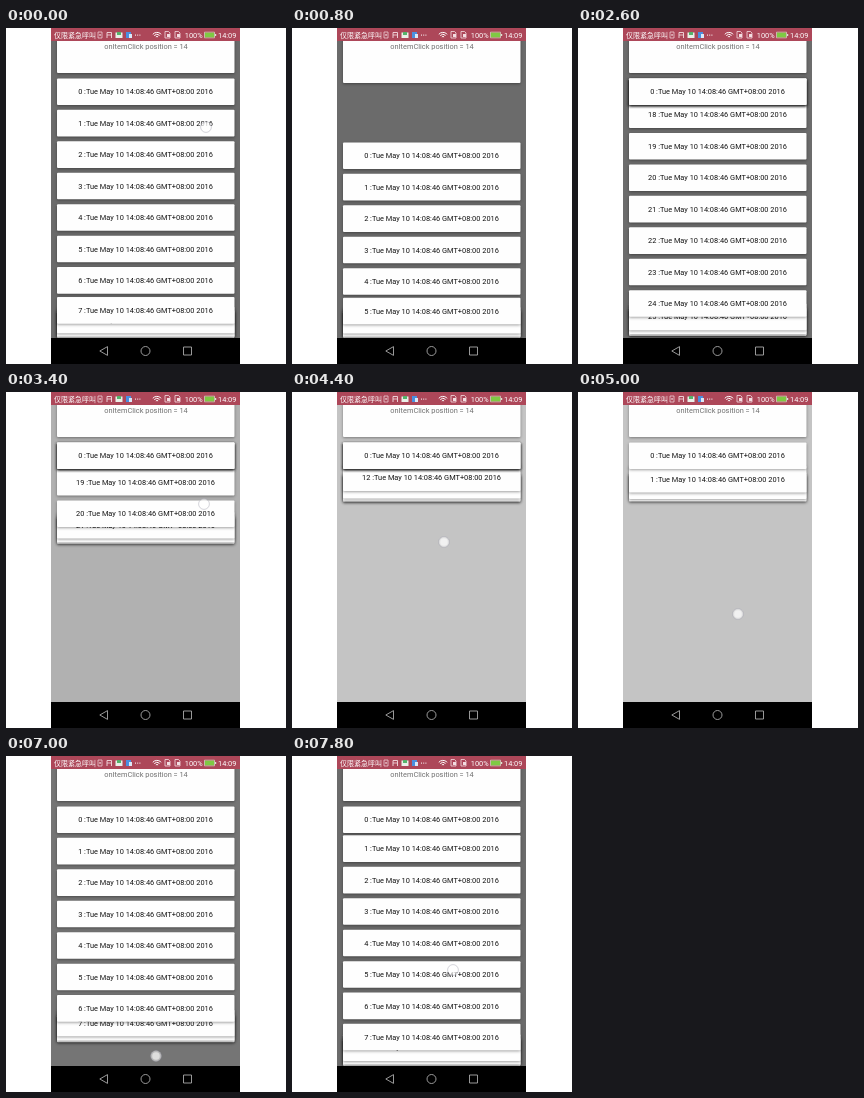
Write an HTML page with a canvas that moves like this. It is 280x336 px and loops after 8 s.

```html
<!DOCTYPE html>
<html lang="en">
<head>
<meta charset="utf-8">
<title>Stacked card list</title>
<style>
  html, body { margin: 0; width: 100%; height: 100%; overflow: hidden; background: #fff; }
  canvas { display: block; width: 280px; height: 336px; }
</style>
</head>
<body>
<canvas></canvas>
<script>
const LOOP = 8000, STEP = 200;
const LEFT = 45, RIGHT = 234, MID = 139.5;
const CARD_X = 51, CARD_W = 177.5, HALF = 13.3;
const FIRST_Y = 63.7, PITCH = 31.45, ITEMS = 32;
const FONT = 'Roboto, Arial, sans-serif';

// Rows are [time, value, ...]; values are interpolated between rows.
const scrollKeys = [
  [0, 0], [200, -12], [800, -64], [1000, -36], [1200, 0], [1400, 30],
  [2000, 310], [2400, 505], [2600, 543], [3400, 571], [3600, 575],
  [4000, 575], [4400, 350], [4800, 30], [5000, 0],
  [7400, 0], [7600, 1], [7800, 2.5]
];
const bottomKeys = [
  [0, 310], [2400, 310], [2600, 308], [3400, 152], [3600, 110],
  [5000, 110], [5200, 118], [6200, 206], [6400, 216], [7200, 310]
];
const touches = [
  [[0, 200, 99], [200, 198, 130], [600, 176, 300]],
  [[1400, 185, 290], [1800, 195, 110]],
  [[2800, 196, 230], [3400, 198, 112], [3600, 198, 70]],
  [[4200, 150, 90], [4400, 152, 150]],
  [[4800, 158, 205], [5000, 160, 222], [6200, 141, 313], [6400, 140, 317]],
  [[6600, 150, 230], [7000, 150, 300]],
  [[7600, 161, 218], [7800, 161, 214]]
];

const canvas = document.querySelector('canvas');
const ctx = canvas.getContext('2d');
const ratio = window.devicePixelRatio || 1;
canvas.width = 280 * ratio;
canvas.height = 336 * ratio;

function sample(keys, t, column = 1) {
  const next = keys.findIndex(key => key[0] > t);
  if (next < 0) return keys[keys.length - 1][column];
  if (next === 0) return keys[0][column];
  const a = keys[next - 1], b = keys[next];
  return a[column] + (b[column] - a[column]) * (t - a[0]) / (b[0] - a[0]);
}

function rect(x, y, w, h, color) {
  ctx.fillStyle = color;
  ctx.fillRect(x, y, w, h);
}

function label(text, x, y, color, align = 'center', font = FONT, size = 7.4) {
  ctx.font = `${size}px ${font}`;
  ctx.textAlign = align;
  ctx.fillStyle = color;
  ctx.fillText(text, x, y);
}

function outline(points, color, width, close = true) {
  ctx.beginPath();
  points.forEach(([x, y]) => ctx.lineTo(x, y));
  if (close) ctx.closePath();
  ctx.strokeStyle = color;
  ctx.lineWidth = width;
  ctx.stroke();
}

function card(top, bottom) {
  ctx.save();
  ctx.shadowColor = 'rgba(0,0,0,.38)';
  ctx.shadowBlur = 3 * ratio;
  ctx.shadowOffsetY = ratio;
  ctx.fillStyle = '#fefefe';
  ctx.beginPath();
  ctx.roundRect(CARD_X, top, CARD_W, bottom - top, 1);
  ctx.fill();
  ctx.restore();
}

// Cards close to the list's bottom edge are squeezed into a pile.
function pileUp(y, bottom) {
  const gap = bottom - y - HALF;
  const squeezed = gap > 16 ? gap : 16 * Math.exp((gap - 16) / 28);
  return bottom - HALF - squeezed;
}

function drawList(scroll, bottom) {
  for (let i = ITEMS - 1; i >= 0; i--) {
    const free = FIRST_Y + PITCH * i - scroll;
    if (i > 0 && free < -40 || free > bottom + 110) continue;
    const y = pileUp(Math.max(FIRST_Y, free), bottom);
    card(y - HALF, y + HALF);
    label(`${i} :Tue May 10 14:08:46 GMT+08:00 2016`, MID, y + 2.6, '#111');
  }
}

function drawStatusBar() {
  rect(LEFT, 0, RIGHT - LEFT, 13, '#ad4759');
  label('仅限紧急呼叫', 48, 9.6, '#fff', 'left', '"Noto Sans CJK SC", "Noto Sans CJK", sans-serif', 7);
  const pale = '#f3dde1';
  outline([[92, 4], [96, 4], [96, 10], [92, 10]], pale, .7);
  rect(93.3, 6.2, 1.5, 1.5, pale);
  outline([[101, 10], [101, 4.5], [105.5, 4.5], [105.5, 10]], pale, .9, false);
  outline([[101, 7], [105.5, 7]], pale, .8, false);
  rect(109.5, 4.5, 7, 5.5, '#e9efe8');
  rect(111, 4, 4, 3, '#55b36b');
  rect(120, 4, 5, 6, '#4a8fe0');
  rect(123, 6, 3, 4, '#dce8f6');
  for (let x = 129; x < 135; x += 2.2) rect(x, 6.6, 1, 1, '#fff');

  ctx.strokeStyle = '#fff';
  ctx.lineWidth = 1;
  for (const r of [1.5, 3.6, 5.6]) {
    ctx.beginPath();
    ctx.arc(151, 10, r, -Math.PI * .77, -Math.PI * .23);
    ctx.stroke();
  }
  for (const x of [159, 169]) {
    outline([[x, 3.5], [x + 3.5, 3.5], [x + 5, 5], [x + 5, 10], [x, 10]], pale, .8);
    rect(x + 2, 6, 3, 3, pale);
  }
  label('100%', 178.8, 9.7, '#fff', 'left');
  outline([[198.5, 4.2], [208.5, 4.2], [208.5, 9.8], [198.5, 9.8]], '#d9e8cf', .7);
  rect(199, 4.7, 9, 4.6, '#7fc943');
  rect(209, 6, 1.2, 2, '#d9e8cf');
  label('14:09', 212, 9.7, '#fff', 'left');
}

function drawNavBar() {
  rect(LEFT, 310, RIGHT - LEFT, 26, '#000');
  const line = '#aaa';
  outline([[93.8, 323], [101.5, 318.6], [101.5, 327.4]], line, .9);
  outline([[177.5, 319], [185.5, 319], [185.5, 327], [177.5, 327]], line, .9);
  ctx.beginPath();
  ctx.arc(MID, 323, 4.5, 0, 7);
  ctx.stroke();
}

function drawTouch(t) {
  const path = touches.find(keys => t >= keys[0][0] && t <= keys[keys.length - 1][0]);
  if (!path) return;
  const x = sample(path, t, 1), y = sample(path, t, 2);
  ctx.beginPath();
  ctx.arc(x, y, 5.4, 0, 7);
  ctx.fillStyle = 'rgba(255,255,255,.5)';
  ctx.fill();
  ctx.strokeStyle = 'rgba(150,150,165,.5)';
  ctx.lineWidth = .8;
  ctx.stroke();
  ctx.beginPath();
  ctx.arc(x, y, 3.8, 0, 7);
  ctx.fillStyle = 'rgba(255,255,255,.5)';
  ctx.fill();
}

function draw(t) {
  const scroll = sample(scrollKeys, t), bottom = sample(bottomKeys, t);
  const gray = Math.round(107 + (310 - bottom) * .445);
  ctx.setTransform(ratio, 0, 0, ratio, 0, 0);
  rect(0, 0, 280, 336, '#fff');
  ctx.save();
  ctx.beginPath();
  ctx.rect(LEFT, 0, RIGHT - LEFT, 336);
  ctx.clip();
  rect(LEFT, 0, RIGHT - LEFT, 336, `rgb(${gray},${gray},${gray})`);
  drawList(scroll, bottom);
  card(5, 45 + Math.max(0, -scroll) * .156);
  label('onItemClick position = 14', 140, 21, '#707070');
  drawStatusBar();
  drawNavBar();
  drawTouch(t);
  ctx.restore();
}

const start = performance.now();
function tick() {
  const t = (performance.now() - start) % LOOP;
  draw(Math.floor(t / STEP) * STEP);
  requestAnimationFrame(tick);
}
tick();
</script>
</body>
</html>
```
